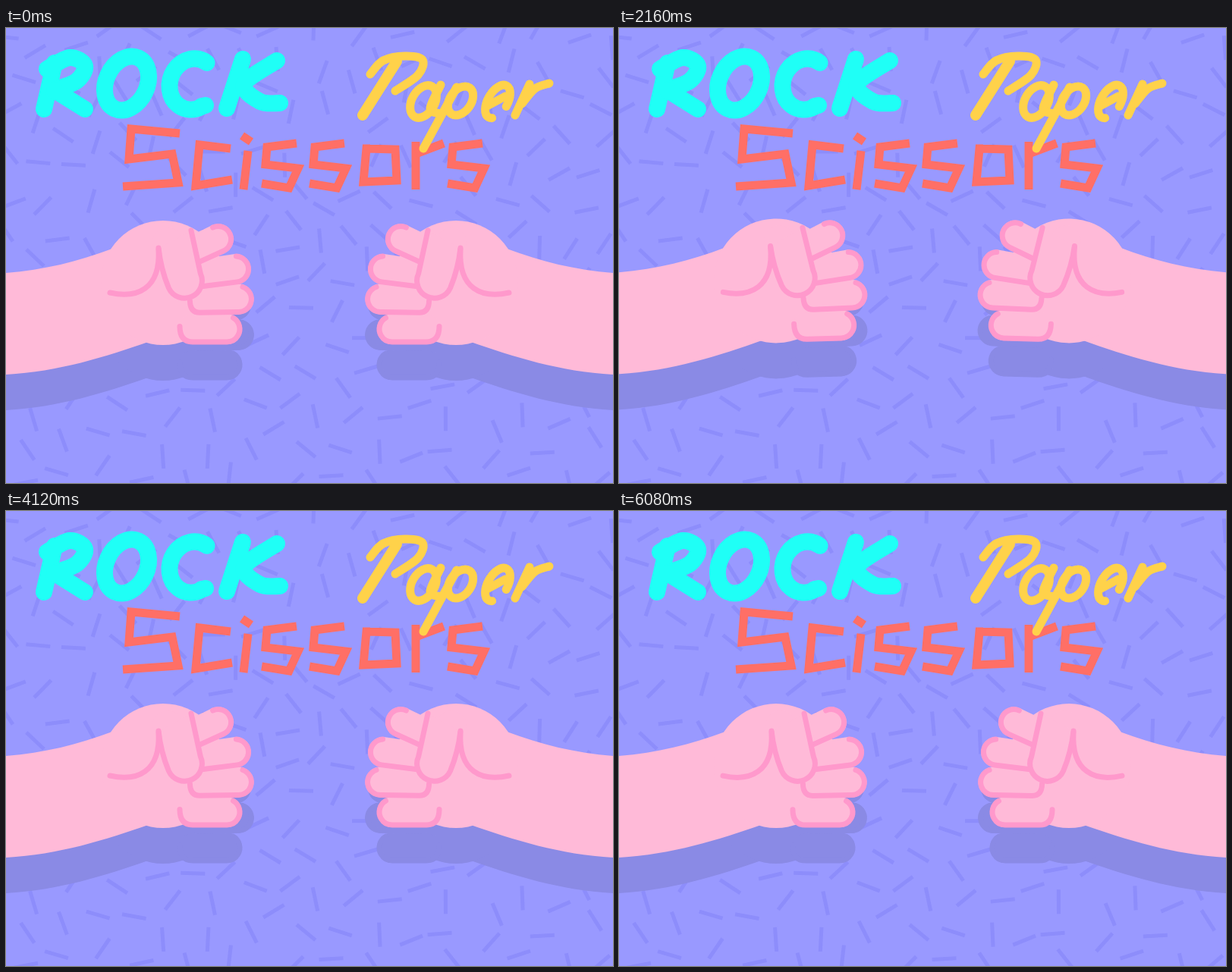
Animation of 800 by 600 pixels, one loop 6120 ms. Source, as an HTML page with a canvas:

```html
<!DOCTYPE html>
<html lang="en">
<head>
<meta charset="utf-8">
<title>Rock Paper Scissors</title>
<style>
html, body { margin: 0; width: 100%; height: 100%; overflow: hidden; background: #9999ff; }
canvas { display: block; width: 800px; height: 600px; }
</style>
</head>
<body>
<canvas id="stage" width="800" height="600" role="img" aria-label="Rock Paper Scissors"></canvas>
<script>
const W = 800, H = 600, LOOP = 6120, ROUND = 2040, STEP = 40;
const BG = '#9999ff', FLECK = '#8d8dfb', SHADE = '#8a8ae5', SKIN = '#ffbad8', LINE = '#ff99cc';
const ctx = document.getElementById('stage').getContext('2d');

const lerp = (a, b, t) => a + (b - a) * t;
const clamp = v => Math.max(0, Math.min(1, v));
const smooth = t => t * t * (3 - 2 * t);
const cubic = t => t < .5 ? 4 * t ** 3 : 1 - 4 * (1 - t) ** 3;
const rad = d => d * Math.PI / 180;

function layer(paint) {
  const c = document.createElement('canvas');
  c.width = W;
  c.height = H;
  paint(c.getContext('2d'));
  return c;
}

// ---------- background: evenly scattered flecks ----------
function paintFlecks(g) {
  let seed = 11;
  const rnd = () => (seed = seed * 16807 % 2147483647) / 2147483647;
  const marks = [];
  g.fillStyle = BG;
  g.fillRect(0, 0, W, H);
  g.strokeStyle = FLECK;
  g.lineWidth = 5;
  for (let i = 0; i < 8000; i++) {
    const x = rnd() * W, y = rnd() * H, a = rnd() * Math.PI;
    if (marks.some(m => Math.hypot(m[0] - x, m[1] - y) < 37)) continue;
    marks.push([x, y]);
    const dx = 16 * Math.cos(a), dy = 16 * Math.sin(a);
    poly(g, [x - dx, y - dy], [x + dx, y + dy]);
  }
}

// ---------- lettering ----------
function poly(g, ...p) {
  g.beginPath();
  p.forEach(q => g.lineTo(...q));
  g.stroke();
}

// smooth line through the points
function curve(g, ...p) {
  g.beginPath();
  g.moveTo(...p[0]);
  for (let i = 0; i < p.length - 1; i++) {
    const a = p[i - 1] || p[i], b = p[i], c = p[i + 1], d = p[i + 2] || c;
    g.bezierCurveTo(b[0] + (c[0] - a[0]) / 6, b[1] + (c[1] - a[1]) / 6,
      c[0] - (d[0] - b[0]) / 6, c[1] - (d[1] - b[1]) / 6, c[0], c[1]);
  }
  g.stroke();
}

function oval(g, x, y, rx, ry, tilt, from = 0, to = -360) {
  g.beginPath();
  g.ellipse(x, y, rx, ry, rad(tilt), rad(from), rad(to), true);
  g.stroke();
}

function pen(g, color, width, cap) {
  g.strokeStyle = color;
  g.lineWidth = width;
  g.lineCap = cap;
  g.lineJoin = cap === 'round' ? 'round' : 'miter';
}

function paintRock(g) {
  pen(g, '#1ffff6', 22, 'round');
  poly(g, [64, 46], [50, 107]);
  curve(g, [54, 54], [84, 39], [104, 50], [93, 70], [62, 82]);
  poly(g, [64, 82], [104, 107]);
  oval(g, 159, 73, 27, 37, 25);
  oval(g, 246, 74, 30, 34, 20, -75, -315);
  poly(g, [258, 103], [263, 102]);
  poly(g, [312, 41], [291, 106]);
  curve(g, [357, 43], [314, 74], [335, 97], [361, 99]);
}

function paintScissors(g) {
  pen(g, '#ff6f66', 11, 'butt');
  poly(g, [229, 139], [165, 133], [162, 173], [219, 166], [227, 204], [154, 209]);
  poly(g, [296, 159], [255, 154], [250, 208], [298, 200]);
  poly(g, [311, 142], [323, 150]);
  poly(g, [319, 162], [313, 213]);
  for (const x of [337, 400, 582])
    poly(g, [x + 46, 152], [x + 7, 157], [x + 5, 180], [x + 48, 185], [x + 36, 211], [x, 205]);
  poly(g, [475, 159], [513, 160], [515, 201], [471, 203], [475, 159], [480, 159]);
  poly(g, [540, 150], [540, 213]);
  poly(g, [540, 166], [577, 152]);
}

function paintPaper(g) {
  pen(g, '#ffd24a', 14, 'round');
  poly(g, [515, 44], [470, 115]);
  g.lineWidth = 11;
  curve(g, [480, 61], [497, 43], [526, 37], [549, 42], [543, 62], [513, 83]);
  oval(g, 550, 97, 15, 23, 30);
  curve(g, [573, 75], [559, 106], [572, 113]);
  poly(g, [594, 78], [550, 159]);
  oval(g, 599, 96, 14, 21, 35);
  poly(g, [634, 103], [658, 90]);
  oval(g, 648, 97, 13, 24, 30, 0, -290);
  poly(g, [690, 74], [671, 115]);
  curve(g, [680, 100], [697, 80], [716, 73]);
}

const backdrop = layer(paintFlecks);
const title = layer(g => {
  paintRock(g);
  paintScissors(g);
  paintPaper(g);
});

// ---------- hands (left one; the right is mirrored) ----------
const ELBOW = [-138, 340], WRIST = [176, 337], PALM = [207, 336, 82];
const REACH = [76, 110, 122, 94];   // open finger lengths, little finger first

function spin(deg, [x, y]) {
  ctx.translate(x, y);
  ctx.rotate(rad(deg));
  ctx.translate(-x, -y);
}

function disc(x, y, r) {
  ctx.beginPath();
  ctx.arc(x, y, r, 0, 7);
  ctx.fill();
}

function drawArm() {
  ctx.beginPath();
  ctx.moveTo(-60, 328);
  ctx.lineTo(0, 323);
  ctx.bezierCurveTo(50, 319, 95, 308, 140, 291);
  ctx.lineTo(210, 330);
  ctx.lineTo(225, 385);
  ctx.quadraticCurveTo(215, 404, 190, 413);
  ctx.bezierCurveTo(130, 434, 70, 453, 0, 457);
  ctx.lineTo(-60, 458);
  ctx.fill();
}

// tapered limb lying along +x, tip at the origin
function taper(len, root, tip) {
  ctx.beginPath();
  ctx.moveTo(-len, -root);
  ctx.lineTo(0, -tip);
  ctx.arc(0, 0, tip, -Math.PI / 2, Math.PI / 2);
  ctx.lineTo(-len, root);
  ctx.arc(-len, 0, root, Math.PI / 2, Math.PI * 1.5);
  ctx.fill();
}

function strokeLine(w) {
  if (w < .1) return;
  ctx.lineWidth = w;
  ctx.stroke();
}

// i counts from the little finger up, e is how far it is stretched
function drawFinger(i, e) {
  const fan = 38 - 21.7 * i;
  const x = lerp(291 + 25 * i - 9.6 * i * i, 255 + REACH[i] * Math.cos(rad(fan)), e);
  const y = lerp(397 - 39.5 * i, 394 - 35 * i + REACH[i] * Math.sin(rad(fan)), e);
  const r = lerp(20, 19, e), k = r - 3;
  const tail = lerp(45 + 11 * i - 5 * i * i, 12, e), c = lerp(17 - 4 * i, 11, e);
  ctx.save();
  ctx.translate(x, y);
  ctx.rotate(rad(lerp(-.9 * i ** 3, fan, e)));
  taper(lerp(45, REACH[i], e), lerp(19, 27, e), r);
  ctx.beginPath();
  ctx.arc(0, 0, k, rad(-60 - 10 * i), Math.PI / 2);
  ctx.lineTo(-tail, k);
  ctx.quadraticCurveTo(-tail - c, k, -tail - c, k - c * 1.2);
  strokeLine(7 * clamp((1 - e) * 2.8));
  ctx.restore();
}

function drawThumb(e) {
  const a = rad(lerp(66, -72, e)), len = lerp(55, 61, e), r = lerp(23, 27, e);
  const x = 213 + len * Math.cos(a), y = 283 + len * Math.sin(a);
  const nx = -Math.sin(a), ny = Math.cos(a);
  const w = 7 * clamp((1 - e) * 1.5), far = clamp(e * 2);

  ctx.save();
  ctx.translate(x, y);
  ctx.rotate(a);
  taper(len, lerp(20, 31, e), r);
  ctx.restore();

  ctx.beginPath();
  ctx.moveTo(201, 290);
  ctx.quadraticCurveTo((201 + x + nx * r) / 2 + nx * 4, (290 + y + ny * r) / 2 + ny * 4, x + nx * r, y + ny * r);
  ctx.arc(x, y, r, a + Math.PI / 2, a - Math.PI / 2, true);
  ctx.lineTo(lerp(244, 212, far), lerp(267, 256, far));
  if (e < .7) ctx.fill();
  strokeLine(w);

  ctx.beginPath();
  ctx.moveTo(201, 292);
  ctx.bezierCurveTo(204, 345, 172, 357, 137, 349);
  strokeLine(w);
}

function drawPalmLine(e) {
  ctx.beginPath();
  ctx.moveTo(220, 306);
  ctx.quadraticCurveTo(250, 335, 232, 372);
  strokeLine(7 * clamp((e - .68) / .32));
}

function drawHand(shape, pose, mirrored, shade) {
  const two = shape === 'rock' ? 0 : pose.open, all = shape === 'paper' ? pose.open : 0;
  ctx.save();
  if (mirrored) {
    ctx.translate(W, 0);
    ctx.scale(-1, 1);
  }
  ctx.translate(pose.push, shade ? 47 : 0);
  ctx.fillStyle = shade ? SHADE : SKIN;
  ctx.strokeStyle = shade ? SHADE : LINE;
  ctx.lineCap = ctx.lineJoin = 'round';
  spin(pose.arm, ELBOW);
  drawArm();
  spin(pose.hand, WRIST);
  disc(...PALM);
  for (let i = 0; i < 4; i++) drawFinger(i, i < 2 ? all : two);
  drawThumb(all ** 2.4);
  drawPalmLine(all);
  ctx.restore();
}

// ---------- timing: lift, throw, hold, return ----------
const GAMES = [['paper', 'scissors'], ['scissors', 'rock'], ['rock', 'paper']];

// each key adds a step to the value: start, end, amount
const track = (p, ...keys) =>
  keys.reduce((v, [from, to, by]) => v + by * cubic(clamp((p - from) / (to - from))), 0);

function poseAt(p) {
  return {
    arm: track(p, [40, 440, -9.8], [440, 860, 12.3], [860, 1240, -3.1], [1560, 1900, 1.3], [1900, 2020, -.7]),
    hand: track(p, [40, 440, -42.5], [440, 915, 42.5], [915, 1240, -24], [1560, 1900, 24]),
    push: track(p, [440, 860, 6], [860, 1240, -6]),
    open: smooth(clamp((p - 600) / 180)) - smooth(clamp((p - 1620) / 240))
  };
}

function draw(ms) {
  const t = Math.floor(ms % LOOP / STEP) * STEP;
  const pose = poseAt(t % ROUND);
  const game = GAMES[Math.floor(t / ROUND)];
  ctx.drawImage(backdrop, 0, 0);
  for (const shade of [true, false])
    game.forEach((shape, side) => drawHand(shape, pose, side === 1, shade));
  ctx.drawImage(title, 0, 0);
}

const start = performance.now();
function tick() {
  draw(performance.now() - start);
  requestAnimationFrame(tick);
}
tick();
</script>
</body>
</html>
```
